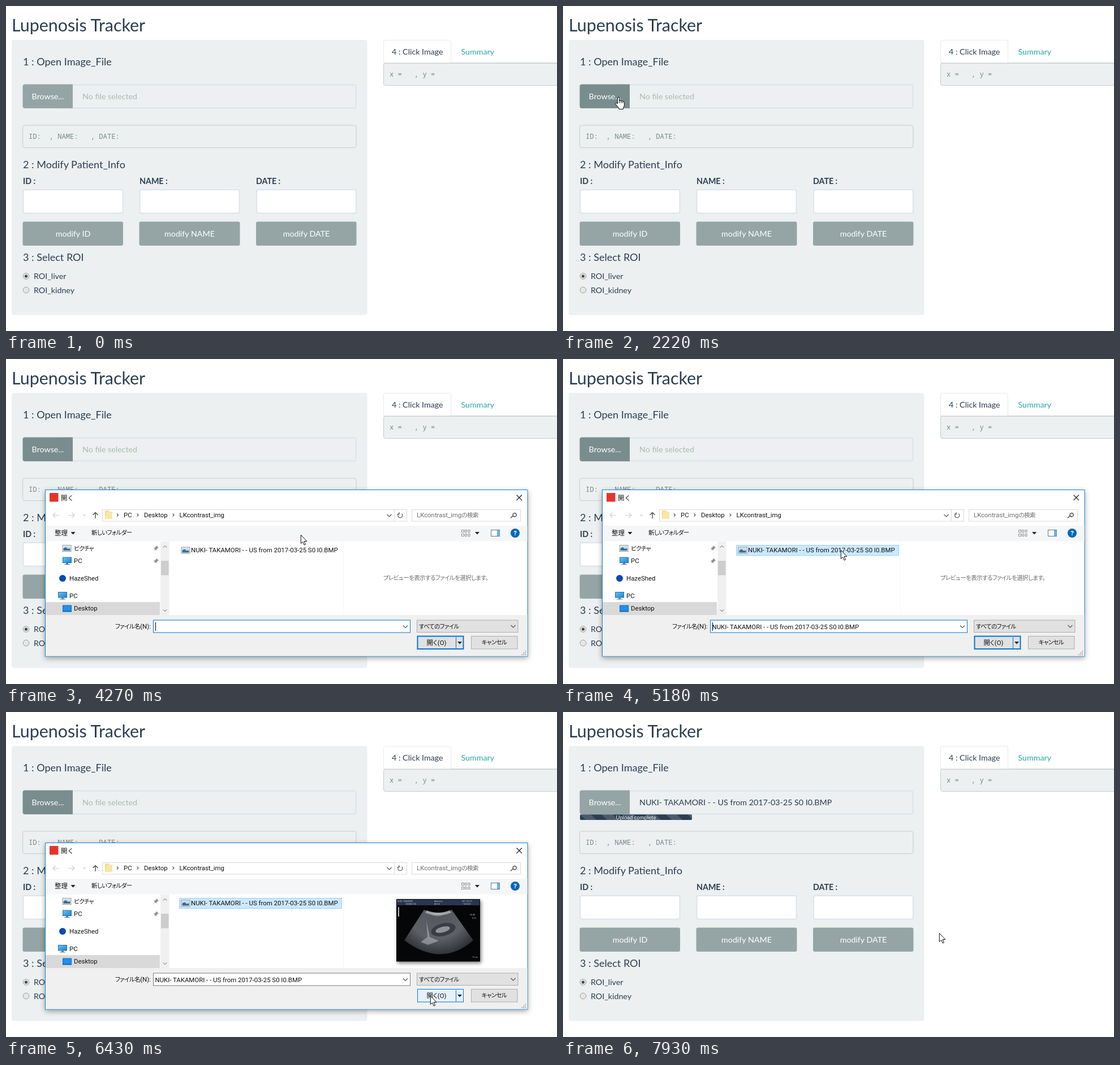
Animation, 974 px wide and 575 px high, one loop 8 s. Source, as an HTML page:

```html
<!DOCTYPE html>
<html lang="ja">
<head>
<meta charset="utf-8">
<title>Upload demo</title>
<style>
html, body { margin: 0; width: 100%; height: 100%; overflow: hidden; background: #fff; }
svg { display: block; }
text { white-space: pre; }
#page { font: 14.25px Lato, sans-serif; fill: #2c3e50; }
#page .h1 { font-size: 30.4px; }
#page .h4 { font-size: 18.05px; }
.label { font-weight: 700; }
.mono { font: 12.2px "Noto Sans Mono", monospace; fill: #7b8a8b; }
.mid { text-anchor: middle; }
.white { fill: #fff; }
.panel { fill: #ecf0f1; }
.pre { fill: #ecf0f1; stroke: #c6cccd; }
.input { fill: #fff; stroke: #dce4ec; stroke-width: 1.9; }
.btn { fill: #95a5a6; }
#browse.hover { fill: #798d8f; }
#browse.press { fill: #687b7c; }
#dialog { font: 11.4px Roboto, "Noto Sans CJK JP", sans-serif; fill: #111; transform-origin: 495px 378px; }
#frame { fill: #fff; stroke: #1883d7; filter: drop-shadow(0 3px 5px rgba(0,0,0,.35)); }
.jp { font-size: 10.5px; letter-spacing: -.55px; font-feature-settings: "palt"; }
.line { fill: none; stroke: #555; stroke-width: 1.2; }
.box { fill: #fff; stroke: #d9d9d9; }
.ctl { fill: #e1e1e1; stroke: #adadad; }
.ctl.hover { fill: #e5f1fb; stroke: #0078d7; }
#open { stroke: #0078d7; stroke-width: 2; }
#open.hover { stroke-width: 1; }
#open.press { fill: #cce4f7; stroke: #005499; }
#field { fill: #fff; stroke: #7a7a7a; }
#field.focus { stroke: #0078d7; }
#row { fill: none; }
#row.hover { fill: #e5f3ff; }
#row.picked { fill: #cce8ff; stroke: #99d1ff; }
.grey { fill: #6d6d6d; }
.cursor { fill: #fff; stroke: #000; stroke-width: .95; stroke-linejoin: round; }
</style>
</head>
<body>
<svg width="974" height="575" viewBox="0 0 974 575">
<defs>
  <linearGradient id="sky" x2="1" y2="1"><stop stop-color="#5cc3f5"/><stop offset="1" stop-color="#1b86d8"/></linearGradient>
  <radialGradient id="echo" gradientUnits="userSpaceOnUse" cx="763" cy="350" r="86">
    <stop stop-color="#a2a5aa"/><stop offset=".16" stop-color="#55585e"/>
    <stop offset=".6" stop-color="#5d6066"/><stop offset="1" stop-color="#26282c"/>
  </radialGradient>
  <pattern id="stripes" x="30" y="181" width="38" height="38" patternUnits="userSpaceOnUse">
    <path fill="#fff" fill-opacity=".15" d="M0 38V19L19 38ZM0 0H19L38 19V38Z"/>
  </pattern>
  <clipPath id="barClip"><rect id="barShape" x="30" y="181.3" width="0" height="9.6" rx="2"/></clipPath>
  <clipPath id="treeClip"><rect x="70" y="323" width="203" height="130"/></clipPath>
  <g id="pc"><rect x="-8" y="-6.5" width="16" height="10.5" fill="#2a6ea5"/><rect x="-7" y="-5.5" width="14" height="8.5" fill="url(#sky)"/><path fill="#5f7f98" d="M-2 4h4v2h3v1H-5V6h3Z"/></g>
  <g id="desk"><rect x="-8" y="-6" width="16" height="12" rx=".5" fill="#1469b0"/><rect x="-7" y="-5" width="14" height="9" fill="#1e90f0"/></g>
  <g id="pic"><rect x="-7.5" y="-5.5" width="15" height="11" fill="#fff" stroke="#8a8f94"/><rect x="-6" y="-4" width="12" height="8" fill="#b9dcf3"/><path fill="#3b6f86" d="M-6 4V0l4-2 4 3 4-1v4Z"/></g>
  <g id="doc"><path fill="#fff" stroke="#7d8790" d="M-5-6.5H2.500L5.500-3.500V6.500H-5Z"/><path stroke="#3a7bb5" d="M-3-2.500H3M-3 0H3M-3 2.500H3M-3 4.500H3"/></g>
  <path id="down" fill="#2f86d6" d="M-3-7H3V-1H7L0 7-7-1H-3Z"/>
  <path id="pin" fill="#8b9298" d="M1-5 5-1 3.500-.5 1 2 .5 4-1.500 2-5 5-2 1.500-4-.5-2-1 .5-3.500Z"/>
  <path id="tri" fill="#222" d="M-4-2H4L0 2.500Z"/>
  <path id="chev" class="line" d="M-4-2 0 2 4-2"/>
  <path id="next" class="line" d="M-1.500-2.500 1-0-1.500 2.500"/>
</defs>

<g id="page">
  <text class="h1" x="10" y="45">Lupenosis Tracker</text>
  <rect class="panel" x="10" y="60" width="628.500" height="486.500" rx="4"/>
  <text class="h4" x="30" y="105">1 : Open Image_File</text>
  <rect class="input" x="100" y="139.500" width="518.500" height="41" rx="3" style="fill:#ecf0f1"/>
  <path id="browse" class="btn" d="M118 138.500V181H33.500Q29.500 181 29.500 177V142.500Q29.500 138.500 33.500 138.500Z"/>
  <text class="mid white" x="74" y="165">Browse...</text>
  <text id="noFile" x="135" y="165" fill="#abbbab">No file selected</text>
  <text id="hasFile" x="135" y="165">NUKI- TAKAMORI - - US from 2017-03-25 S0 I0.BMP</text>
  <g clip-path="url(#barClip)">
    <rect x="30" y="181" width="590" height="10" fill="#2c3e50"/>
    <rect x="30" y="181" width="590" height="10" fill="url(#stripes)"/>
    <text id="barText" class="mid white" y="189.800" style="font-size:9.500px">Upload complete</text>
  </g>
  <rect class="pre" x="29.500" y="211" width="589.500" height="39.500" rx="3.500"/>
  <text class="mono" x="40" y="234.500">ID:  , NAME:   , DATE:</text>
  <text class="h4" x="30" y="287">2 : Modify Patient_Info</text>
  <text class="label" x="30" y="314.500">ID :</text>
  <text class="label" x="236" y="314.500">NAME :</text>
  <text class="label" x="442" y="314.500">DATE :</text>
  <rect class="input" x="30.500" y="325" width="176" height="41.500" rx="3"/>
  <rect class="input" x="236.500" y="325" width="176" height="41.500" rx="3"/>
  <rect class="input" x="443" y="325" width="176" height="41.500" rx="3"/>
  <rect class="btn" x="29.500" y="381.500" width="177.500" height="42.500" rx="3"/>
  <rect class="btn" x="235.500" y="381.500" width="178" height="42.500" rx="3"/>
  <rect class="btn" x="442" y="381.500" width="177.500" height="42.500" rx="3"/>
  <text class="mid white" x="118.500" y="408">modify ID</text>
  <text class="mid white" x="324.500" y="408">modify NAME</text>
  <text class="mid white" x="531" y="408">modify DATE</text>
  <text class="h4" x="30" y="451">3 : Select ROI</text>
  <g fill="#e6e6e6" stroke="#9a9a9a"><circle cx="35.500" cy="478" r="5.300"/><circle cx="35.500" cy="502.500" r="5.300"/></g>
  <circle cx="35.500" cy="478" r="2.600" fill="#4a4a4a"/>
  <text x="49" y="483">ROI_liver</text>
  <text x="49" y="508">ROI_kidney</text>

  <rect class="pre" x="667.500" y="101" width="330" height="39.500" rx="3.500"/>
  <path fill="#fff" stroke="#e6ebec" d="M667.500 101V64Q667.500 60.500 671 60.500H783Q786.500 60.500 786.500 64V101"/>
  <path stroke="#c6cccd" d="M668 101H974"/>
  <text x="682" y="86">4 : Click Image</text>
  <text x="804.500" y="86" fill="#2aa8a0">Summary</text>
  <text class="mono" x="678" y="125">x =   , y =</text>
</g>

<g id="dialog">
  <rect id="frame" x="69.500" y="231.500" width="852.500" height="294.500"/>
  <rect x="70" y="295" width="851.500" height="27.500" fill="#f5f6f7"/>
  <rect x="70" y="453" width="851.500" height="72.500" fill="#f0f0f0"/>
  <rect x="77" y="237" width="15.500" height="15.500" fill="#e4352c"/>
  <text x="97" y="249.500">開く</text>
  <path class="line" d="M902.500 240.500 912 250M912 240.500 902.500 250" style="stroke:#222"/>

  <path class="line" d="M94 276.500H83M87.500 272 83 276.500 87.500 281M110 276.500H121M116.500 272 121 276.500 116.500 281M136 275 138.500 277.500 141 275" style="stroke:#cfcfcf"/>
  <path class="line" d="M158 282V271.500M153.500 276 158 271.500 162.500 276" style="stroke-width:1.500"/>
  <rect class="box" x="170.500" y="266.500" width="538" height="20.500"/>
  <path stroke="#d9d9d9" d="M686.500 267V287"/>
  <path fill="#f6d37a" d="M175 268.500H182L183 270H187.500V283H175Z"/>
  <path fill="#fbe6a5" d="M177 270H187.500V283H175Z"/>
  <use href="#next" x="197.500" y="276"/><text x="208" y="279.500">PC</text>
  <use href="#next" x="233" y="276"/><text x="244" y="279.500">Desktop</text>
  <use href="#next" x="296" y="276"/><text x="306.500" y="279.500">LKcontrast_img</text>
  <use href="#chev" x="677.500" y="277"/>
  <path class="line" d="M699.500 273.800A4 4 0 1 1 694.500 273.500M695 271V274.500H691.500"/>
  <rect class="box" x="717.500" y="266.500" width="192" height="20.500"/>
  <text class="grey" x="726" y="279.500">LKcontrast_img<tspan class="jp">の検索</tspan></text>
  <path class="line" d="M892 281.500 896 277.500M896.200 277.200A3.200 3.200 0 1 1 898 278.800A3.200 3.200 0 0 1 896.200 277.200" style="stroke-width:1.500"/>

  <text x="86" y="311.500">整理</text><use href="#tri" x="118.500" y="308"/>
  <text class="jp" x="151" y="311">新しいフォルダー</text>
  <path fill="none" stroke="#8a8f94" d="M805.500 302.500h4v4h-4zM805.500 309.500h4v4h-4zM811.500 302.500h3v4h-3zM811.500 309.500h3v4h-3zM817 302.500h3v4h-3zM817 309.500h3v4h-3z"/>
  <use href="#tri" x="833" y="308"/>
  <rect x="857.500" y="302.500" width="15" height="11" fill="#fff" stroke="#5a7894"/><rect x="868" y="303" width="4.500" height="10" fill="#6bb4e8"/>
  <circle cx="900" cy="308" r="8" fill="#0067b8"/>
  <text class="mid white" x="900" y="312.200" style="font-weight:700">?</text>

  <g clip-path="url(#treeClip)">
    <g id="treeA">
      <rect x="70" y="354" width="202" height="22.500" fill="#d9d9d9"/>
      <use href="#pc" x="100" y="342"/><text x="112" y="346">PC</text>
      <use href="#desk" x="108" y="365.500"/><text x="120" y="369">Desktop</text>
      <use href="#down" x="108" y="388"/><text class="jp" x="120" y="391.500">ダウンロード</text>
      <use href="#doc" x="107.500" y="411"/><text class="jp" x="120" y="414.500">ドキュメント</text>
      <use href="#pic" x="107.500" y="434"/><text class="jp" x="120" y="437">ピクチャ</text>
      <rect x="101" y="450.500" width="13" height="10" fill="#33475a"/><text class="jp" x="120" y="460">ビデオ</text>
    </g>
    <g id="treeB">
      <rect x="70" y="430" width="202" height="23" fill="#d9d9d9"/>
      <use href="#pic" x="107.500" y="335"/><text class="jp" x="120" y="338.500">ピクチャ</text><use href="#pin" x="265" y="335"/>
      <use href="#pc" x="108" y="357"/><text x="120" y="361">PC</text><use href="#pin" x="265" y="357.500"/>
      <circle cx="100" cy="388" r="6" fill="#094ab2"/><text x="112" y="392">HazeShed</text>
      <use href="#pc" x="100" y="418.500"/><text x="112" y="422.500">PC</text>
      <use href="#desk" x="108" y="441.500"/><text x="120" y="445">Desktop</text>
    </g>
  </g>
  <rect x="273" y="323" width="15.500" height="130" fill="#f0f0f0"/>
  <rect id="thumb" x="274" y="374" width="13.500" height="25.500" fill="#cdcdcd"/>
  <use href="#chev" transform="translate(281 332) scale(.8 -.8)"/>
  <use href="#chev" transform="translate(281 445) scale(.8)"/>
  <path stroke="#f6f6f6" d="M596.500 323V453"/>

  <rect id="row" x="306.500" y="329.500" width="287" height="18"/>
  <use href="#pic" x="317.500" y="338.500"/>
  <text x="327" y="342">NUKI- TAKAMORI - - US from 2017-03-25 S0 I0.BMP</text>

  <text id="hint" class="jp grey" x="667" y="391">プレビューを表示するファイルを選択します。</text>
  <g id="preview">
    <rect x="690" y="331" width="148" height="110.500" fill="#050608" style="filter:drop-shadow(2px 3px 3px rgba(0,0,0,.5))"/>
    <rect x="691" y="332" width="146" height="10" fill="#2b3450"/>
    <g fill="#c5cad6" style="font-size:3.500px">
      <text x="692" y="336">NUKI- TAKAMORI</text><text x="757" y="336">Abdomen</text><text x="806" y="336">2017-03-25</text>
      <text x="707" y="340.500">ROOM 2 US</text><text x="757" y="340.500">MI 0.8</text><text x="808" y="340.500">10:24:35</text>
      <text x="820" y="360">60 dB</text><text x="824" y="366">G 52</text><text x="824" y="435">15 cm</text>
    </g>
    <path fill="url(#echo)" d="M739 350Q763 361 788 350L826 404Q770 453 704 404Z"/>
    <path fill="#c8cacf" fill-opacity=".65" d="M744 351Q764 359 784 351L787 355Q763 365 741 355Z"/>
    <path fill="#b8bbc0" fill-opacity=".55" d="M743 368L749 398 765 405 746 412 733 407 745 398Z"/>
    <ellipse cx="773" cy="385" rx="22" ry="11" fill="#3a3d42" transform="rotate(-14 773 385)"/>
    <ellipse cx="772" cy="385" rx="13" ry="5" fill="#8f9298" transform="rotate(-14 772 385)"/>
    <path fill="#fff" fill-opacity=".7" d="M693 345h2v17h-2z"/>
  </g>

  <text class="jp" x="193" y="476.500">ファイル名<tspan style="font-size:11.400px;letter-spacing:0">(N):</tspan></text>
  <rect id="field" x="260.500" y="462" width="454" height="22"/>
  <text id="fieldText" x="263.500" y="477.500">NUKI- TAKAMORI - - US from 2017-03-25 S0 I0.BMP</text>
  <path id="caret" stroke="#000" d="M264.500 466V481"/>
  <use href="#chev" x="706" y="473.500"/>
  <rect id="filter" class="ctl" x="726.500" y="462" width="178.500" height="21.500"/>
  <text class="jp" x="730" y="476.500">すべてのファイル</text><use href="#chev" x="896.500" y="473"/>
  <rect id="open" class="ctl" x="727.500" y="490.500" width="81" height="22.500"/>
  <path stroke="#0078d7" d="M795.500 492V512"/><use href="#tri" x="802" y="502"/>
  <text class="mid" x="761" y="505.500" style="font-feature-settings:'palt'">開く(O)</text>
  <rect id="cancel" class="ctl" x="822.500" y="490.500" width="81.500" height="22.500"/>
  <text class="jp mid" x="863" y="505">キャンセル</text>
  <path fill="#b5b5b5" d="M917 516h2v2h-2zM917 519h2v2h-2zM917 522h2v2h-2zM914 519h2v2h-2zM914 522h2v2h-2zM911 522h2v2h-2z"/>
</g>

<g id="pointer">
  <path id="arrow" class="cursor" d="M.3 .3V15.500L3.700 12.400 6.200 18 8.500 17 6 11.500H10.800Z"/>
  <g id="hand" class="cursor" transform="translate(-5.600 0)">
    <path d="M4 12V2A1.600 1.600 0 0 1 7.200 2V7.500Q7.300 6.300 8.800 6.300T10.400 7.800Q10.500 6.900 11.900 6.900T13.400 8.500Q13.600 7.700 14.700 7.700T16 9.400V14Q16 17 14 19V21.500H6.500V19.500Q4.500 17.500 .7 12.800-.1 11 1.200 10.400 2.600 10.200 4 12Z"/>
    <path d="M7.200 7.500V11M10.400 7.800V11M13.400 8.500V11"/>
  </g>
  <path id="beam" fill="none" stroke="#222" d="M-3.500-8H-.5M.5-8H3.500M0-8V8M-3.500 8.500H-.5M.5 8.500H3.500"/>
</g>
</svg>

<script>
const LOOP = 8000;
const el = Object.fromEntries([...document.querySelectorAll('svg [id]')].map(e => [e.id, e]));

// Pointer moves: start, end, number of steps, then waypoints
const moves = [
  [690, 1460, 11, [862, 548], [640, 435], [430, 320], [285, 255], [199, 228]],
  [1540, 2220, 10, [190, 223], [150, 200], [115, 175], [98, 161]],
  [3090, 3091, 2, [769, 502], [769, 502]],
  [3650, 4270, 8, [800, 512], [955, 530], [840, 425], [660, 330], [521, 311]],
  [4340, 4800, 7, [518, 316], [508, 322], [496, 333], [491, 338]],
  [5730, 6430, 10, [505, 348], [610, 410], [705, 448], [742, 476], [750, 502]],
  [7600, 7930, 5, [748, 499], [743, 488], [700, 432], [665, 391]],
];

const spline = (a, b, c, d, u) =>
  b + u / 2 * (c - a + u * (2 * a - 5 * b + 4 * c - d + u * (3 * (b - c) + d - a)));

function pointerAt(t) {
  const move = moves.filter(m => t >= m[0]).pop();
  if (!move) return [-50, -50];
  const [start, end, steps, ...pts] = move;
  const last = pts.length - 1;
  const k = Math.floor(Math.min(1, (t - start) / (end - start)) * (steps - 1) + .01);
  const pos = k / (steps - 1) * last;
  const i = Math.min(Math.floor(pos), last - 1);
  const p = j => pts[Math.max(0, Math.min(last, j))];
  return [0, 1].map(n => spline(p(i - 1)[n], p(i)[n], p(i + 1)[n], p(i + 2)[n], pos - i));
}

const show = (id, on) => { el[id].style.display = on ? '' : 'none'; };
const flag = (id, name, on) => el[id].classList.toggle(name, on);
const within = (t, a, b) => t >= a && t < b;

function draw(t) {
  const [x, y] = pointerAt(t);
  const over = (l, top, r, b) => within(x, l, r) && within(y, top, b);
  const dialog = within(t, 2940, 7600);
  const done = t >= 7600;
  const scrolled = t >= 3320;
  const picked = t >= 5110;

  // Page
  const onBrowse = t < 3090 && over(30, 139, 118, 181);
  flag('browse', 'hover', onBrowse || dialog);
  flag('browse', 'press', within(t, 2770, 2940));
  show('noFile', !done);
  show('hasFile', done);
  const barWidth = t < 7770 ? 0 : 198 * (Math.min(t - 7770, 160) / 160) ** 2;
  el.barShape.setAttribute('width', barWidth);
  el.barText.setAttribute('x', 30 + barWidth / 2);

  // Dialog
  show('dialog', dialog);
  const [opacity, scale] = t < 3010 ? [.35, .95] : t < 3090 ? [.8, .985] : t < 7520 ? [1, 1] : [.5, .97];
  el.dialog.style.opacity = opacity;
  el.dialog.style.transform = scale === 1 ? 'none' : `scale(${scale})`;
  show('treeA', !scrolled);
  show('treeB', scrolled);
  el.thumb.setAttribute('y', scrolled ? 357 : 374);
  flag('row', 'hover', over(306, 329, 594, 348));
  flag('row', 'picked', picked);
  show('fieldText', picked);
  flag('field', 'focus', t < 5270);
  show('caret', t < 3650 || within(t, 4200, 4730) || within(t, 5110, 5270));
  show('hint', t < 5350);
  show('preview', t >= 5350);
  flag('filter', 'hover', over(726, 462, 905, 484));
  flag('open', 'hover', over(727, 490, 809, 513));
  flag('open', 'press', t >= 7440);
  flag('cancel', 'hover', over(822, 490, 904, 513));

  // Pointer
  const onText = t < 2940 && (over(30, 211, 619, 250) || over(236, 325, 413, 367) || over(443, 325, 619, 367));
  show('pointer', t >= 690 && !within(t, 2940, 3090));
  show('hand', onBrowse);
  show('beam', onText);
  show('arrow', !onBrowse && !onText);
  el.pointer.setAttribute('transform', `translate(${Math.round(x)} ${Math.round(y)})`);
}

const begin = performance.now();
function tick() {
  draw((performance.now() - begin) % LOOP);
  requestAnimationFrame(tick);
}
tick();
</script>
</body>
</html>
```
